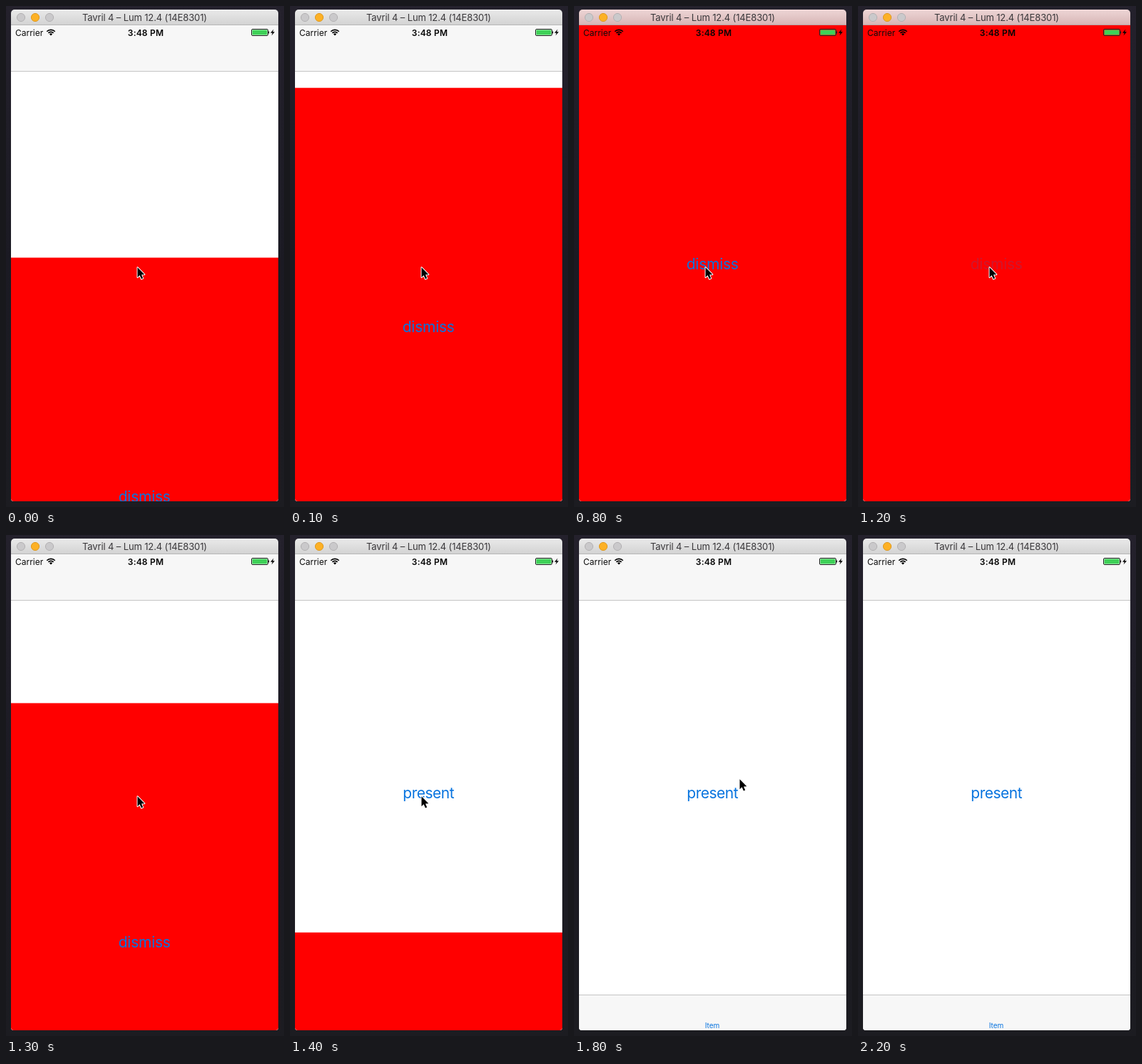
An HTML page with a canvas that plays this animation: 390x702 px, repeating every 3 s.

```html
<!DOCTYPE html>
<html lang="en">
<head>
<meta charset="utf-8">
<title>Modal presentation</title>
<style>
html, body { margin: 0; width: 100%; height: 100%; overflow: hidden; background: #1d1b23; }
canvas { display: block; }
</style>
</head>
<body>
<canvas id="stage" width="390" height="702"></canvas>
<script>
const ctx = document.getElementById('stage').getContext('2d');
const LOOP = 3000, STEP = 100;
const WIN = { x: 7, y: 5, w: 375, h: 689 };
const TOP = 27, BOTTOM = 694, TRAVEL = BOTTOM - TOP;
const BLUE = '#0874df';
const SHOW_AT = -94, HIDE_AT = 1238;

const clamp = v => Math.max(0, Math.min(1, v));
const mix = (a, b, k) => a + (b - a) * k;

// Critically damped spring: share of the way still to go.
function rest(ms) {
  const p = 18.26 * Math.max(0, ms) / 1000;
  return (1 + p) * Math.exp(-p);
}

function sheetOffset(t) {
  return TRAVEL * (t < HIDE_AT ? rest(t - SHOW_AT) : 1 - rest(t - HIDE_AT));
}

function rect(x, y, w, h, fill) {
  ctx.fillStyle = fill;
  ctx.fillRect(x, y, w, h);
}

function text(str, x, y, font, color, align = 'center', spacing = 0) {
  ctx.font = font + ' Inter, Roboto, sans-serif';
  ctx.fillStyle = color;
  ctx.textAlign = align;
  ctx.letterSpacing = spacing + 'px';
  ctx.fillText(str, x, y);
}

function poly(points) {
  ctx.beginPath();
  points.forEach(([x, y]) => ctx.lineTo(x, y));
  ctx.closePath();
}

function backdrop() {
  const g = ctx.createLinearGradient(0, 0, 0, 702);
  g.addColorStop(0, '#24212c');
  g.addColorStop(0.5, '#1b1a23');
  g.addColorStop(1, '#1c1c21');
  rect(0, 0, 390, 702, g);
}

function windowPath() {
  ctx.beginPath();
  ctx.roundRect(WIN.x, WIN.y, WIN.w, WIN.h, [5, 5, 4, 4]);
}

function titleBar(tint) {
  const shade = (v, red) => {
    const c = Math.round(mix(v, red, tint));
    return `rgb(${Math.round(mix(v, v + 4, tint))},${c},${c})`;
  };
  const g = ctx.createLinearGradient(0, 5, 0, 27);
  g.addColorStop(0, shade(234, 214));
  g.addColorStop(1, shade(210, 180));
  rect(WIN.x, 5, WIN.w, 22, g);
  rect(WIN.x, 26, WIN.w, 1, shade(182, 160));
  for (const [x, fill, edge] of [
    [21, '#cac9cb', '#b2b0b2'], [41, '#fdb125', '#dd981f'], [61, '#cac9cb', '#b2b0b2']
  ]) {
    ctx.beginPath();
    ctx.arc(x, 16, 5.6, 0, 7);
    ctx.fillStyle = fill;
    ctx.fill();
    ctx.lineWidth = 1;
    ctx.strokeStyle = edge;
    ctx.stroke();
  }
  text('Tavril 4 – Lum 12.4 (14E8301)', 194.5, 21, '13px', '#3a383b', 'center', -0.13);
}

function mainScreen() {
  rect(WIN.x, TOP, WIN.w, TRAVEL, '#fff');
  rect(WIN.x, TOP, WIN.w, 64, '#f7f7f7');
  rect(WIN.x, 91, WIN.w, 1, '#c4c4c4');
  text('present', 194.2, 369, '21px', BLUE, 'center', -0.5);
  rect(WIN.x, 644, WIN.w, 1, '#c4c4c4');
  rect(WIN.x, 645, WIN.w, 49, '#f7f7f7');
  text('Item', 194, 690.5, '10px', BLUE);
}

function sheet(t) {
  const dy = sheetOffset(t);
  if (dy > TRAVEL - 0.5) return;
  rect(WIN.x, TOP + dy, WIN.w, TRAVEL, '#f00');
  ctx.globalAlpha = t >= 1200 && t < 1300 ? 0.2 : 1;
  text('dismiss', 194.2, 369 + dy, '21px', BLUE, 'center', -0.25);
  ctx.globalAlpha = 1;
}

function wifi(x, y) {
  const a = -Math.PI * 0.75, b = -Math.PI * 0.25;
  ctx.strokeStyle = ctx.fillStyle = '#000';
  ctx.lineWidth = 1.7;
  for (const r of [8.1, 5.1]) {
    ctx.beginPath();
    ctx.arc(x, y, r, a, b);
    ctx.stroke();
  }
  ctx.beginPath();
  ctx.moveTo(x, y);
  ctx.arc(x, y, 3, a, b);
  ctx.fill();
}

function battery() {
  ctx.beginPath();
  ctx.roundRect(344.5, 32.5, 23, 9, 1.5);
  ctx.lineWidth = 1;
  ctx.strokeStyle = '#222';
  ctx.stroke();
  rect(345.5, 33.5, 21, 7, '#3fd158');
  rect(368, 35.5, 1.2, 3, '#222');
  poly([[375.5, 32.5], [371, 37.7], [373.8, 37.7], [372.5, 41.5], [377, 36.2], [374.2, 36.2]]);
  ctx.fillStyle = '#000';
  ctx.fill();
}

function statusBar() {
  text('Carrier', 13, 41.5, '12px', '#0c0c0c', 'left');
  wifi(63, 41.5);
  text('3:48 PM', 196, 41.5, '600 12px', '#050505', 'center', 0.2);
  battery();
}

function pointer(t) {
  if (t >= 2200) return;
  const a = clamp((t - 1600) / 200), b = clamp((t - 1800) / 300);
  const x = mix(184, 232, a * a) + 64 * b;
  const y = mix(366, 342, a * a) - 324 * Math.pow(b, 1.4);
  ctx.save();
  ctx.translate(x, y);
  poly([[0.5, 0.3], [0.5, 14.2], [3.6, 11.3], [5.9, 16.6], [8.2, 15.6], [6, 10.5], [10.3, 10.3]]);
  ctx.lineJoin = 'round';
  ctx.lineWidth = 2;
  ctx.strokeStyle = '#fff';
  ctx.stroke();
  ctx.fillStyle = '#000';
  ctx.fill();
  ctx.restore();
}

function draw(t) {
  backdrop();
  ctx.save();
  windowPath();
  ctx.clip();
  mainScreen();
  sheet(t);
  titleBar(t < 1300 ? clamp((t - 400) / 400) : 0);
  statusBar();
  ctx.restore();
  pointer(t);
}

const start = performance.now();
function tick() {
  const t = (performance.now() - start) % LOOP;
  draw(Math.floor(t / STEP) * STEP);
  requestAnimationFrame(tick);
}
tick();
</script>
</body>
</html>
```
